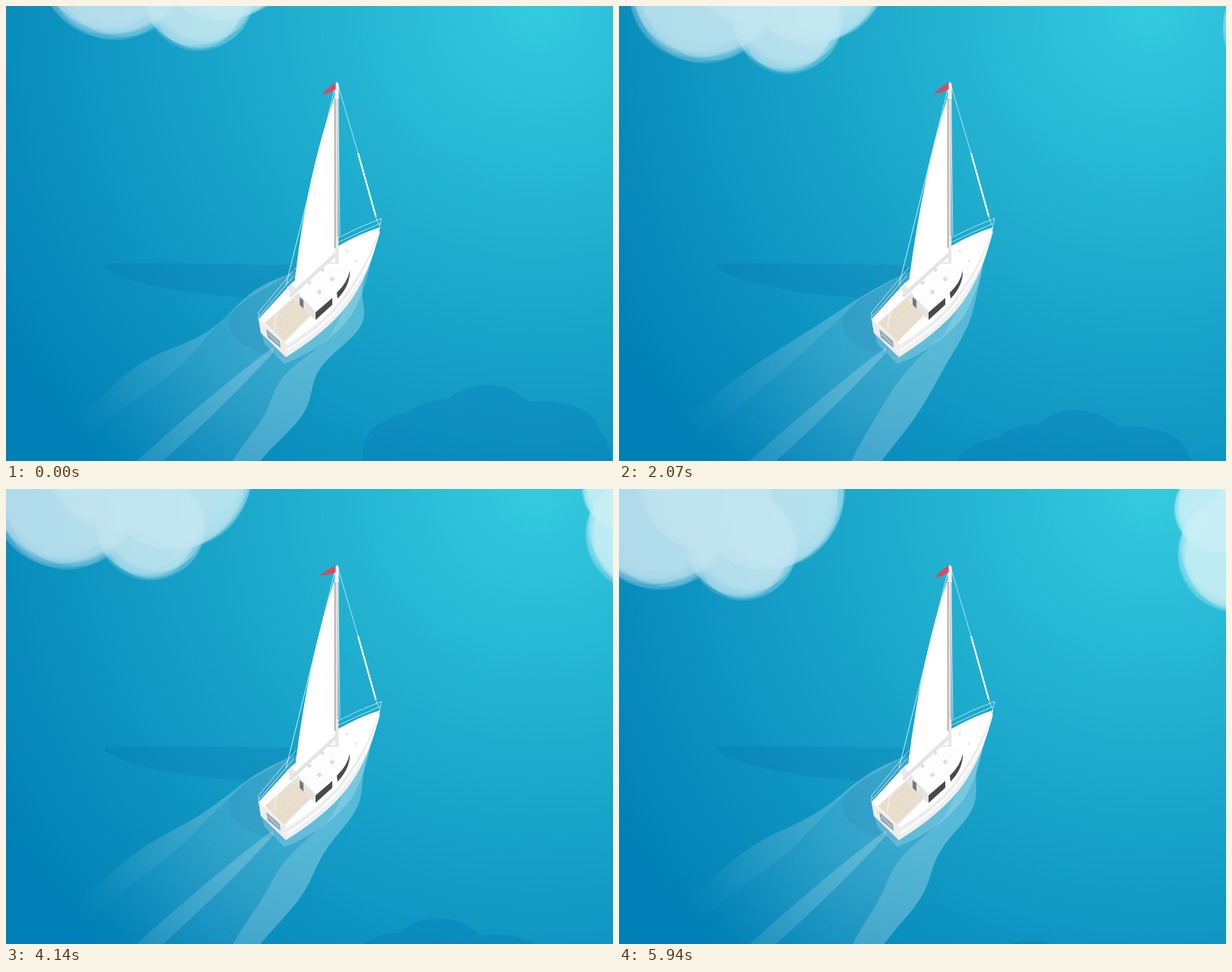
Animation of 800 by 600 pixels, one loop 5.97 s. Source, as an HTML page with a canvas:

```html
<!DOCTYPE html>
<html lang="en">
<head>
<meta charset="utf-8">
<title>Sailing boat</title>
<style>
html, body { margin: 0; width: 100%; height: 100%; overflow: hidden; background: #0b8fc0; }
canvas { display: block; width: 800px; height: 600px; }
</style>
</head>
<body>
<canvas id="stage" width="800" height="600"></canvas>
<script>
const ctx = document.getElementById('stage').getContext('2d');
const LOOP = 5970, SWAY = 3300, FLAP = 750;
const TAU = 2 * Math.PI;
const white = a => `rgba(255,255,255,${a})`;

function fill(shape, color) {
  ctx.fillStyle = color;
  ctx.fill(typeof shape === 'string' ? new Path2D(shape) : shape);
}

function line(d, color, width) {
  ctx.strokeStyle = color;
  ctx.lineWidth = width;
  ctx.stroke(new Path2D(d));
}

function fade(x1, y1, a1, x2, y2, a2) {
  const g = ctx.createLinearGradient(x1, y1, x2, y2);
  g.addColorStop(0, white(a1));
  g.addColorStop(1, white(a2));
  return g;
}

// Wake edges: a quadratic bend from a to b, pushed along `out` by a ripple
const wake = {
  leftOuter: { a: [382, 350], c: [251, 415], b: [75, 560], out: [-0.5, -0.85], amp: 10, len: 0.65, crest: 0.75, swell: 8 },
  leftInner: { a: [318, 386], c: [245, 458], b: [112, 566], out: [-0.5, -0.85], amp: -6, len: 0.9, crest: 0.55, swell: 0 },
  rightOuter: { a: [480, 335], c: [472, 442], b: [335, 600], out: [1, 0], amp: 13, len: 0.5, crest: 0.35, swell: 15 },
  rightInner: { a: [428, 434], c: [360, 489], b: [299, 600], out: [1, 0], amp: -8, len: 0.8, crest: 0.4, swell: 10 }
};

function edge({ a, c, b, out, amp, len, crest, swell }, sway) {
  const pts = [];
  for (let i = 0; i <= 40; i++) {
    const u = i / 40, v = 1 - u;
    const push = sway.ripple * amp * Math.cos(TAU * (u - crest) / len) * Math.sin(Math.PI * u)
      + sway.swell * swell * u * u;
    pts.push([0, 1].map(k => v * v * a[k] + 2 * u * v * c[k] + u * u * b[k] + out[k] * push));
  }
  return pts;
}

function ribbon(from, to) {
  const p = new Path2D();
  [...from, ...[...to].reverse()].forEach(([x, y]) => p.lineTo(x, y));
  p.closePath();
  return p;
}

// Cloud layer of scattered translucent ellipses
function makeCloud(lobes, seed) {
  const c = document.createElement('canvas');
  c.width = 600;
  c.height = 500;
  const g = c.getContext('2d');
  const rnd = () => (seed = (seed * 16807) % 2147483647) / 2147483647;
  g.fillStyle = white(0.19);
  for (const [x, y, r] of lobes) {
    for (let i = 0; i < 12; i++) {
      const shift = rnd() * r * 0.13, dir = rnd() * TAU, size = r - shift - rnd() * 3;
      g.beginPath();
      g.ellipse(x + shift * Math.cos(dir), y + shift * Math.sin(dir), size,
        size * (0.9 + rnd() * 0.1), rnd() * Math.PI, 0, TAU);
      g.fill();
    }
  }
  return c;
}

const bigCloud = makeCloud([[143, 247, 101], [285, 215, 106], [254, 287, 73], [205, 200, 95]], 71);
const sideCloud = makeCloud([[103, 137, 62], [124, 197, 78], [175, 140, 85]], 29);

const sea = ctx.createRadialGradient(700, 0, 0, 700, 0, 840);
sea.addColorStop(0, '#34cbdf');
sea.addColorStop(1, '#0080b6');

const glow = ctx.createRadialGradient(385, 425, 0, 385, 425, 290);
glow.addColorStop(0, white(0.19));
glow.addColorStop(0.45, white(0.12));
glow.addColorStop(1, white(0));

const cloudShadow = new Path2D('M470 600C470 572 478 546 530 536C546 524 563 519 584 518' +
  'C606 496 654 489 690 522C734 517 778 532 782 560C793 572 797 585 798 600L798 720H470Z');

const boatShadow = new Path2D('M128 342C135 338 160 339 190 339L372 341L390 350L400 440L367 463' +
  'C330 462 294 440 294 418C295 405 306 395 318 385C270 381 215 376 170 363C150 357 131 348 128 342Z');

function drawWake(sway) {
  const lo = edge(wake.leftOuter, sway), li = edge(wake.leftInner, sway);
  const ro = edge(wake.rightOuter, sway), ri = edge(wake.rightInner, sway);
  fill(ribbon([...lo, [110, 600]], ro), glow);
  fill(ribbon(lo, li), fade(350, 380, 0.13, 85, 555, 0));
  fill(ribbon(ro, ri), fade(470, 370, 0.14, 325, 600, 0.17));
  fill('M352 450Q285 499 172 600H207Q290 525 352 457Z', fade(345, 460, 0.22, 185, 600, 0.1));
}

function drawHull() {
  const port = 'M493 292Q469 299 437 317L376 366L333 413';
  fill('M336 430L341 446L367 472Q425 449 456 407Q476 370 481 335L369 455Z', white(0.2));
  fill(port + 'L336 431L369 463Q433 423 458 383Q484 342 493 292Z', '#f1f0f0');
  fill(port + 'L370 446Q426 412 448 378Q478 338 493 292Z', '#fff');
  line('M371 454Q429 417 453 380Q481 340 492 297', '#fff', 2);
  line('M371 450Q427 414 450 378Q479 338 491 299', '#e4e3e3', 0.8);
  fill('M333 413L336 431L369 463L370 446Z', '#efecea');
  fill('M343 426L361 442L362 451L345 437Z', '#8fa8b2');
  line('M346 432L360 446', '#b9cbd1', 1.5);
}

function drawDeck() {
  fill('M378 385L402 408L367 443L341 418Z', '#eadfce');
  for (let i = 1; i < 6; i++) {
    line(`M${341 + i * 4.4} ${418 + i * 4.2}l36 -33`, '#dfd3bf', 0.6);
  }
  fill('M378 385L386 377L409 403L407 414Z', '#e5e4e4');
  fill('M370 371L376 367L383 374L378 384Z', '#e9e9e9');
  fill('M387 384L392 388L392 399L387 394Z', '#777');
  fill('M386 380L428 339Q446 337 453 349Q450 375 436 386L408 414L408 403Z', '#fdfdfd');
  fill('M408 404L430 385V394L408 414Z', '#4a4949');
  fill('M436 378Q450 365 453 349Q454 368 437 386Z', '#4a4949');
  const hatch = (x, y, r) => fill(`M${x - r} ${y}l${r} ${-r}l${r} ${r}l${-r} ${r}Z`, '#dfdede');
  for (let i = 0; i < 2; i++) {
    hatch(430 - i * 17, 360 + i * 17, 3.7);
    hatch(417 - i * 17, 348 + i * 17, 3);
    hatch(449 + i * 12, 323 + i * 13, 1.7);
  }
  line('M369 386Q354 402 354 426', white(0.8), 1);
}

function drawRig(t, slack) {
  line('M434 107L369 368', white(0.85), 0.9);
  fill(`M434 117Q${397 + slack * 5} 220 ${381 + slack * 2} 358L382 375L434 324Z`, '#fff');
  line('M437 325L374 383', '#e5e4e4', 4.5);
  line('M421 339H437', '#e8e7e7', 2);
  line('M436 104V340', '#e9e7e6', 4.5);
  line('M433.6 122V319', '#91807d', 1);
  line('M437 121V303', '#b9aaa7', 0.8);
  line('M437.5 122L440 303', white(0.85), 0.8);
  fill('M433.7 104Q434 100.5 436.2 100.5Q438.5 101 438.5 104V121H433.7Z', '#f3f1f1');
  line('M433 121.5H439', '#fff', 1);
  line('M438 106L464 194M487 277L491 288', white(0.8), 0.8);
  line('M464 194L487.5 278', '#fff', 2.2);
  line('M333 414V404L376 352L382 345M334 409L379 356', white(0.8), 0.8);
  line('M437 306Q466 291 495 280L492 293M437 312Q466 298 493 287', white(0.8), 0.8);

  const c = Math.cos(TAU * t / FLAP);
  fill(`M434.5 101Q423 ${107 + c * 0.5} ${414.7 + c * 1.5} ${116 + c * 2}Q426 ${114 + c} 434.5 110Z`, '#dc4860');
}

const start = performance.now();

function draw() {
  const t = (performance.now() - start) % LOOP;
  const angle = TAU * t / SWAY;
  const slack = (1 - Math.cos(angle)) / 2;
  const sway = { ripple: 1 - slack, swell: Math.max(0, -Math.sin(angle)) };
  const dx = -0.0153 * t, dy = 0.0148 * t;

  ctx.fillStyle = sea;
  ctx.fillRect(0, 0, 800, 600);

  ctx.save();
  ctx.translate(dx, 0.0161 * t);
  fill(cloudShadow, 'rgba(0,110,175,0.24)');
  ctx.restore();

  fill(boatShadow, 'rgba(0,90,155,0.15)');
  drawWake(sway);
  drawHull();
  drawDeck();
  drawRig(t, slack);

  ctx.globalAlpha = 0.74;
  ctx.drawImage(bigCloud, dx, dy - 300);
  ctx.drawImage(sideCloud, 780 + dx, dy - 200);
  ctx.globalAlpha = 1;
  requestAnimationFrame(draw);
}
draw();
</script>
</body>
</html>
```
